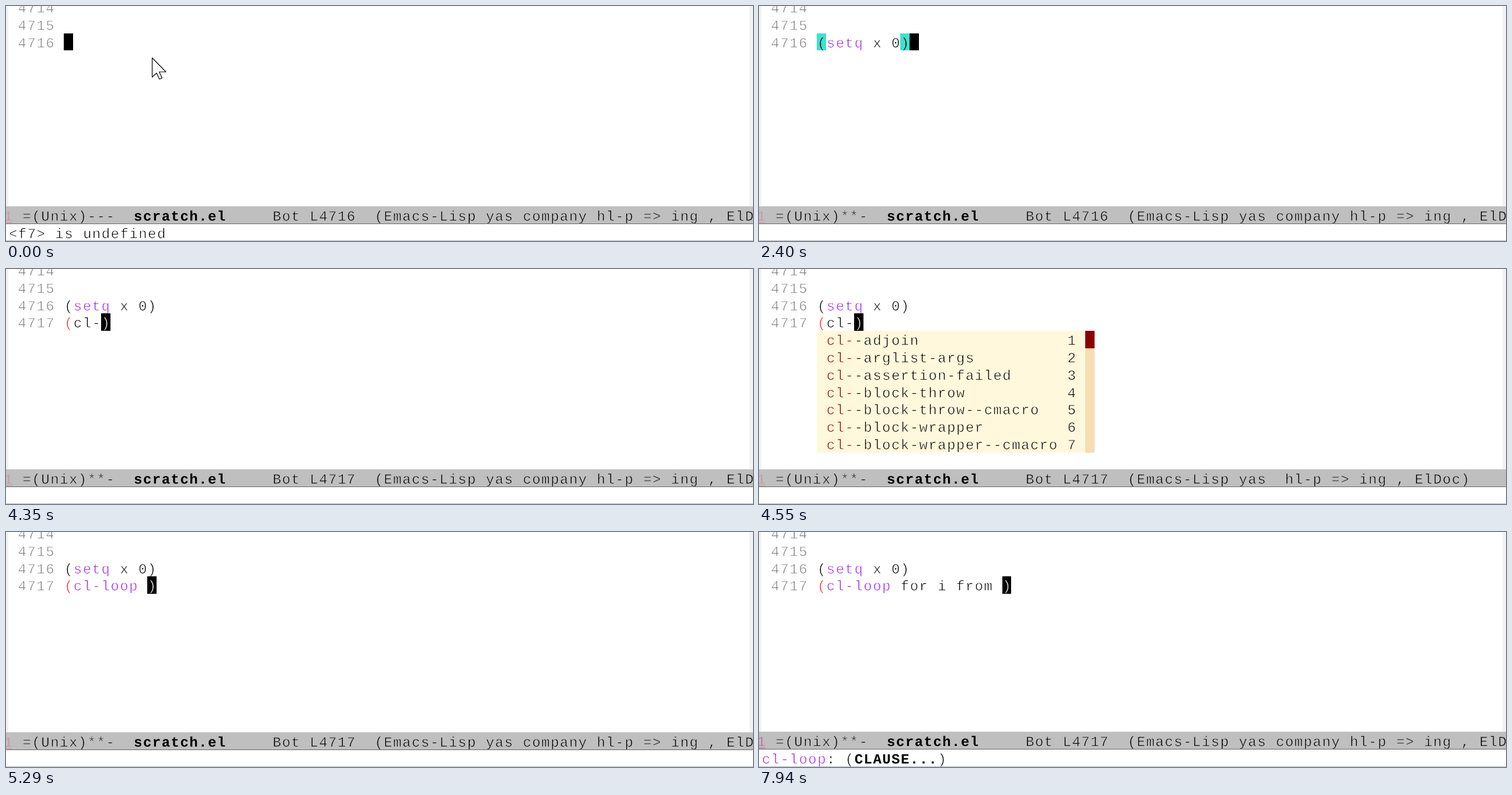
Animation, 1280 px wide and 403 px high, one loop 8 s. Source, as an HTML page with a canvas:

```html
<!DOCTYPE html>
<html lang="en">
<head>
<meta charset="utf-8">
<title>Editing Emacs Lisp</title>
<style>
  html, body { margin: 0; width: 100%; height: 100%; overflow: hidden; background: #fff; }
  canvas { display: block; }
</style>
</head>
<body>
<canvas id="stage" width="1280" height="403"></canvas>
<script>
const ctx = document.getElementById('stage').getContext('2d');
const LOOP = 8000;
const CELL = 15.87, ROW = 29.8, LEFT = 99.2, TOP = 46.6, BASELINE = 70.5;
const FONT_SIZE = 24, GAP = CELL - FONT_SIZE * 0.6;
const BLACK = '#000', WHITE = '#fff', RED = '#ff2525', PURPLE = '#a020f0', GRAY = '#7f7f7f';
const DARK_RED = '#8b0000', CREAM = '#fff8dc', TURQUOISE = '#40e0d0', BAR = '#bfbfbf';

// Keystrokes of each line and the moment each one lands; \b deletes.
const FIRST = {
  keys: '(setq x 0',
  times: [860, 1000, 1200, 1330, 1530, 1670, 1870, 1940, 2140]
};
const SECOND = {
  keys: '(cl-loop for i d\bfrom ',
  times: [3880, 4080, 4150, 4350, 4620, 4820, 4950, 5220, 5290, 5560, 5690, 5760, 5880,
          6540, 6740, 7010, 7400, 7470, 7610, 7670, 7870, 7940]
};
const CLOSED = 2400, EVAL_PREFIX = 2870, EVAL_RESULT = 3150, NEWLINE = 3550, DOC = 6340;

const POPUPS = [
  { from: 4550, thumb: 1, items: ['cl--adjoin', 'cl--arglist-args', 'cl--assertion-failed', 'cl--block-throw',
    'cl--block-throw--cmacro', 'cl--block-wrapper', 'cl--block-wrapper--cmacro'] },
  { from: 4620, thumb: 2, items: ['cl--labels-convert', 'cl--loop-build-ands', 'cl--loop-handle-accum',
    'cl--loop-let', 'cl--loop-set-iterator-function', 'cl-labels', 'cl-ldiff'] },
  { from: 4820, thumb: 6, items: ['cl--loop-build-ands', 'cl--loop-handle-accum', 'cl--loop-let',
    'cl--loop-set-iterator-function', 'cl-loop', 'cl-loop--cmacro', 'cl-lookup'] },
  { from: 5290, items: [] }
];

const colX = col => LEFT + CELL * col;
const rowY = row => TOP + ROW * row;

function rect(x1, y1, x2, y2, color) {
  const [l, t, r, b] = [x1, y1, x2, y2].map(Math.round);
  ctx.fillStyle = color;
  ctx.fillRect(l, t, r - l, b - t);
}

// Regular text is thinned to a light weight by an outline in the paper colour.
function text(str, x, y, color = BLACK, paper = WHITE, weight = 'normal') {
  ctx.font = `${weight} ${FONT_SIZE}px "Liberation Mono", "Courier New", monospace`;
  ctx.letterSpacing = GAP + 'px';
  ctx.fillStyle = color;
  ctx.fillText(str, x + GAP / 2, y);
  if (weight === 'bold') return;
  ctx.strokeStyle = paper;
  ctx.lineWidth = 0.7;
  ctx.strokeText(str, x + GAP / 2, y);
}

// Draws [string, color, weight] runs one after another on the character grid.
function runs(x, y, paper, parts) {
  for (const [str, color, weight] of parts) {
    text(str, x, y, color, paper, weight);
    x += CELL * str.length;
  }
}

const code = (str, col, row, color, paper) => text(str, colX(col), BASELINE + ROW * row, color, paper);
const cell = (col, row, color) => rect(colX(col), rowY(row), colX(col + 1), rowY(row + 1), color);

function litCell(char, col, row, color, paper) {
  cell(col, row, paper);
  code(char, col, row, color, paper);
}

function typed({ keys, times }, t) {
  let out = '';
  times.forEach((at, i) => {
    if (t >= at) out = keys[i] === '\b' ? out.slice(0, -1) : out + keys[i];
  });
  return out;
}

function codeLine(str, row, keyword, parenColor) {
  code(str.slice(0, 1), 0, row, parenColor);
  const isKeyword = str.startsWith('(' + keyword);
  const end = isKeyword ? keyword.length + 1 : 1;
  if (isKeyword) code(keyword, 1, row, PURPLE);
  code(str.slice(end), end, row);
}

function drawCode(t) {
  for (let i = 0; i < 3; i++) text(String(4714 + i), colX(-5), BASELINE + ROW * (i - 2), GRAY);

  const first = typed(FIRST, t);
  const closed = t >= CLOSED;
  codeLine(first + (closed ? ')' : ''), 0, 'setq', t >= 1000 && !closed ? RED : BLACK);
  if (t < NEWLINE) {
    if (closed) {
      litCell('(', 0, 0, BLACK, TURQUOISE);
      litCell(')', first.length, 0, BLACK, TURQUOISE);
    }
    litCell(first && !closed ? ')' : '', first.length + closed, 0, WHITE, BLACK);
    return;
  }

  code('4717', -5, 1, GRAY);
  const second = typed(SECOND, t);
  codeLine(second, 1, 'cl-loop', t >= 3950 ? RED : BLACK);
  litCell(second ? ')' : '', second.length, 1, WHITE, BLACK);
}

function drawPopup({ items, thumb }) {
  const width = Math.max(...items.map(s => s.length));
  const bar = width + 4, bottom = 2 + items.length;
  rect(LEFT, rowY(2), colX(bar), rowY(bottom), CREAM);
  rect(colX(bar), rowY(2), colX(bar + 1), rowY(bottom), '#f5deb3');
  rect(colX(bar), rowY(2), colX(bar + 1), rowY(2 + thumb), DARK_RED);
  items.forEach((item, i) => {
    code(item.slice(0, 3), 1, 2 + i, DARK_RED, CREAM);
    code(item.slice(3), 4, 2 + i, BLACK, CREAM);
    code(String(i + 1), width + 2, 2 + i, BLACK, CREAM);
  });
}

function drawModeLine(t, popupOpen) {
  const shift = t >= DOC ? -1 : 0;
  rect(0, 343 + shift, 1280, 344 + shift, '#dadada');
  rect(0, 344 + shift, 1280, 373 + shift, BAR);
  rect(0, 373 + shift, 1280, 374 + shift, '#666');
  const badge = shift ? '#d0509a' : '#d28c98';
  rect(0, 371 + shift, 11, 372 + shift, badge);
  runs(-3.9, 367.5 + shift, BAR, [
    ['1', badge],
    [` =(Unix)${t < 860 ? '---' : '**-'}  `],
    ['scratch.el', BLACK, 'bold'],
    [`     Bot L${t < NEWLINE ? 4716 : 4717}  (Emacs-Lisp yas ${popupOpen ? '' : 'company'} hl-p => ing , ElDoc)`]
  ]);
}

function echoMessage(t) {
  if (t < 860) return [['<f7> is undefined']];
  if (t >= DOC) return [['cl-loop', PURPLE], [': ('], ['CLAUSE...', BLACK, 'bold'], [')']];
  if (t >= NEWLINE || t < EVAL_PREFIX) return [];
  return t < EVAL_RESULT ? [['C-x-']] : [['0 (#o0, #x0, ?\\C-@)']];
}

function drawPointer() {
  ctx.strokeStyle = BLACK;
  ctx.lineWidth = 1.2;
  ctx.stroke(new Path2D('M250.5 89V122L258 115L263 125.5L267.5 123.5L262.5 113H274Z'));
}

function draw(t) {
  rect(0, 0, 1280, 403, WHITE);
  rect(0, 0, 4, 344, '#f2f2f2');
  rect(1274, 0, 1280, 344, '#f2f2f2');
  drawCode(t);
  const popup = POPUPS.filter(p => t >= p.from).pop();
  const popupOpen = Boolean(popup && popup.items.length);
  if (popupOpen) drawPopup(popup);
  drawModeLine(t, popupOpen);
  runs(4.2, t >= DOC ? 396.8 : 397.5, WHITE, echoMessage(t));
  rect(0, 402, 1280, 403, '#b4b4b4');
  if (t < 860) drawPointer();
}

ctx.textRendering = 'geometricPrecision';
ctx.lineJoin = 'round';
const start = performance.now();
function tick() {
  draw((performance.now() - start) % LOOP);
  requestAnimationFrame(tick);
}
tick();
</script>
</body>
</html>
```
